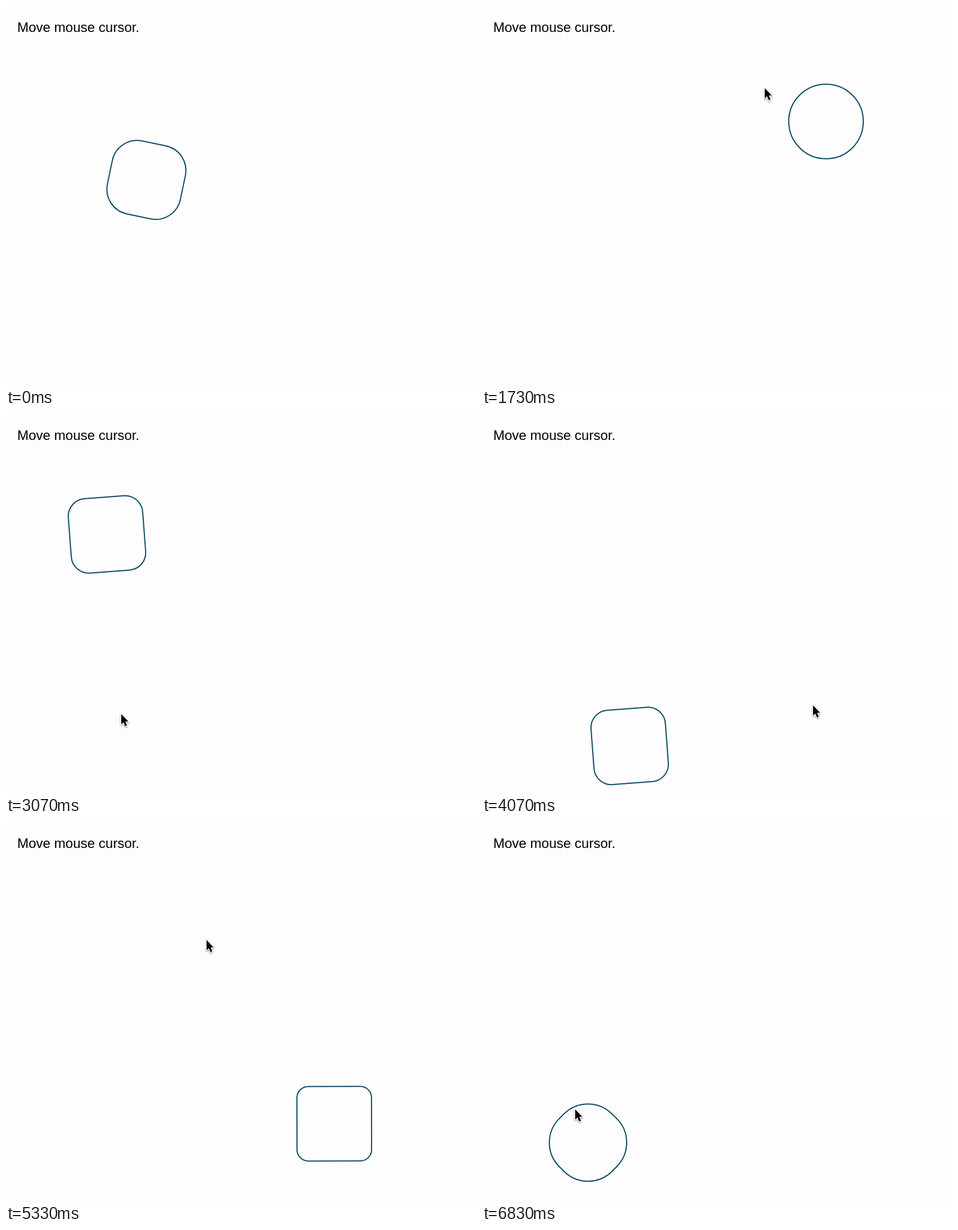
Write an HTML page with a canvas that moves like this. It is 832x673 px and loops after 6860 ms.

```html
<!DOCTYPE html>
<html lang="en">
<head>
<meta charset="utf-8">
<title>Move mouse cursor</title>
<style>
  html, body { margin: 0; width: 100%; height: 100%; overflow: hidden; background: #fdfdfd; }
  canvas { position: absolute; left: 0; top: 0; display: block; }
  p {
    position: absolute; left: 20px; top: 24px; margin: 0;
    font: 24px/28px "Liberation Sans", Arial, sans-serif;
    color: #000; white-space: nowrap;
  }
</style>
</head>
<body>
<canvas id="stage" width="832" height="673"></canvas>
<p>Move mouse cursor.</p>
<script>
const LOOP = 6860;
const MOVE = 320;
const MORPH = 510;
const SIDE = 132;
const ctx = document.getElementById("stage").getContext("2d");

// Each trip: slide to (x, y), then morph to a circle (rise) and back (fall).
const home = { x: 248.5, y: 308, fall: -251 };
const trips = [
  { start: 905, x: 609, y: 204.5, rise: 1155, fall: 1740 },
  { start: 2046, x: 177, y: 201, rise: 2237, fall: 2777 },
  { start: 3017, x: 233, y: 589, rise: 3237, fall: 3777 },
  { start: 3995, x: 611, y: 574, rise: 4217, fall: 4964 },
  { start: 5237, x: 379, y: 266, rise: 5464, fall: 6015 },
  { start: 6287, x: 188.5, y: 566.5, rise: 6513, fall: 7060 }
];

// Pointer legs: from time, to time, end point.
const pointerStart = { x: 834, y: 205 };
const legs = [
  { from: 890, to: 1160, x: 584, y: 146 },
  { from: 1620, to: 2010, x: 153.5, y: 143 },
  { from: 2420, to: 2860, x: 204, y: 531.5 },
  { from: 3310, to: 3660, x: 586, y: 516 },
  { from: 4430, to: 4900, x: 355, y: 209 },
  { from: 5850, to: 6250, x: 165, y: 509 }
];

const clamp = v => Math.min(1, Math.max(0, v));
const mix = (a, b, p) => a + (b - a) * p;
const smooth = v => v * v * (3 - 2 * v);

function inOutBack(v) {
  const s = 1.3;
  if (v < 0.5) {
    const y = 2 * v;
    return y * y * ((s + 1) * y - s) / 2;
  }
  const y = 2 * v - 2;
  return (y * y * ((s + 1) * y + s) + 2) / 2;
}

function slide(age) {
  const v = clamp(age / MOVE);
  const curve = u => Math.pow(2 * u, 2.5) / 2;
  const base = v < 0.5 ? curve(v) : 1 - curve(1 - v);
  return base + 0.025 * Math.sin(Math.PI * clamp((age - 260) / 300));
}

function boxAt(t) {
  let { x, y } = home;
  let q = 1 - inOutBack(clamp((t - home.fall) / MORPH));
  for (const trip of trips) {
    if (t >= trip.start) {
      const p = slide(t - trip.start);
      x = mix(x, trip.x, p);
      y = mix(y, trip.y, p);
    }
    if (t >= trip.rise) q = inOutBack(clamp((t - trip.rise) / MORPH));
    if (t >= trip.fall) q = 1 - inOutBack(clamp((t - trip.fall) / MORPH));
  }
  return { x, y, q };
}

function pointerAt(t) {
  let { x, y } = pointerStart;
  for (const leg of legs) {
    const p = smooth(clamp((t - leg.from) / (leg.to - leg.from)));
    x = mix(x, leg.x, p);
    y = mix(y, leg.y, p);
  }
  return { x, y };
}

function drawBox({ x, y, q }) {
  const half = SIDE / 2;
  const radius = Math.min(half, 20 + 46 * q);
  ctx.save();
  ctx.translate(x, y);
  ctx.rotate(2 * Math.PI * q);
  ctx.beginPath();
  ctx.roundRect(-half, -half, SIDE, SIDE, radius);
  ctx.lineWidth = 2;
  ctx.strokeStyle = "#0b4a60";
  ctx.stroke();
  ctx.restore();
}

const arrow = [[0, 0], [0, 18], [4, 14.4], [7, 21.4], [10.2, 20], [7.2, 13.2], [12.6, 13]];

function drawPointer({ x, y }) {
  ctx.save();
  ctx.translate(x, y);
  ctx.beginPath();
  arrow.forEach(([px, py]) => ctx.lineTo(px, py));
  ctx.closePath();
  ctx.lineJoin = "round";
  ctx.lineWidth = 2.6;
  ctx.strokeStyle = "#fff";
  ctx.shadowColor = "rgba(0,0,0,0.4)";
  ctx.shadowBlur = 3;
  ctx.shadowOffsetY = 1.5;
  ctx.stroke();
  ctx.shadowColor = "transparent";
  ctx.fillStyle = "#000";
  ctx.fill();
  ctx.restore();
}

function draw(t) {
  ctx.fillStyle = "#fdfdfd";
  ctx.fillRect(0, 0, 832, 673);
  drawBox(boxAt(t));
  if (t >= legs[0].from) drawPointer(pointerAt(t));
}

let origin = null;
function tick(now) {
  if (origin === null) origin = now;
  draw((now - origin) % LOOP);
  requestAnimationFrame(tick);
}
draw(0);
requestAnimationFrame(tick);
</script>
</body>
</html>
```
